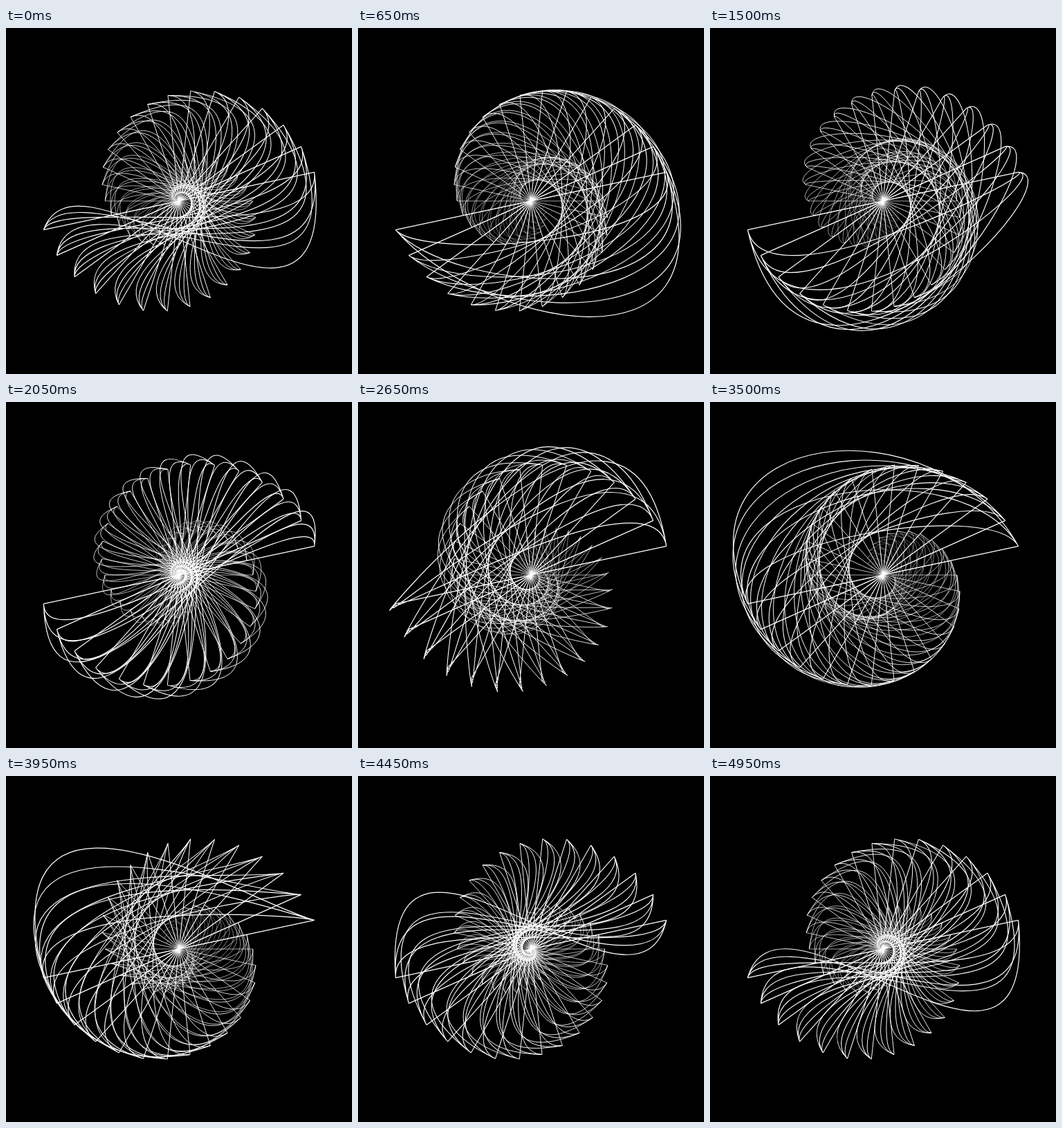
An HTML page with a canvas for the animation above (5 s loop, 500x500 px).

```html
<!DOCTYPE html>
<html lang="en">
<head>
<meta charset="utf-8">
<title>Spiral shell</title>
<style>
  html, body { margin: 0; height: 100%; overflow: hidden; background: #000; }
  canvas { display: block; }
</style>
</head>
<body>
<canvas id="stage" width="500" height="500"></canvas>
<script>
const ctx = document.getElementById('stage').getContext('2d');
const TAU = Math.PI * 2;
const STEP = 50;          // ms per pose
const POSES = 100;        // poses per loop
const BLADES = 30;
const STRANDS = 3;        // curves per blade, besides the straight one
const RADIUS = 200;
const SWING_Y = 362, SWING_X = SWING_Y / 4;

// One blade: curves between two fixed tips, their handles circling a quarter turn apart.
function drawBlade(phase) {
  const sin = Math.sin(phase), cos = Math.cos(phase);
  ctx.beginPath();
  for (let i = 0; i <= STRANDS; i++) {
    const dx = SWING_X * i / STRANDS, dy = SWING_Y * i / STRANDS;
    ctx.moveTo(RADIUS, 0);
    ctx.bezierCurveTo(
      RADIUS + dx * sin, dy * cos,
      -RADIUS + dx * cos, dy * sin,
      -RADIUS, 0);
  }
  ctx.stroke();
}

function draw(now) {
  const pose = Math.floor(now / STEP) % POSES;
  const phase = TAU * (pose - 6) / POSES;
  ctx.setTransform(1, 0, 0, 1, 0, 0);
  ctx.fillStyle = '#000';
  ctx.fillRect(0, 0, 500, 500);
  ctx.strokeStyle = '#fff';
  ctx.lineWidth = 1.2;
  for (let k = 0; k < BLADES; k++) {
    const size = 1 - k / BLADES;
    ctx.setTransform(1, 0, 0, 1, 250, 250);
    ctx.rotate(-TAU * (k + 1) / BLADES);
    ctx.scale(size, size);
    drawBlade(phase);
  }
}

function tick() {
  draw(performance.now());
  requestAnimationFrame(tick);
}
tick();
</script>
</body>
</html>
```
